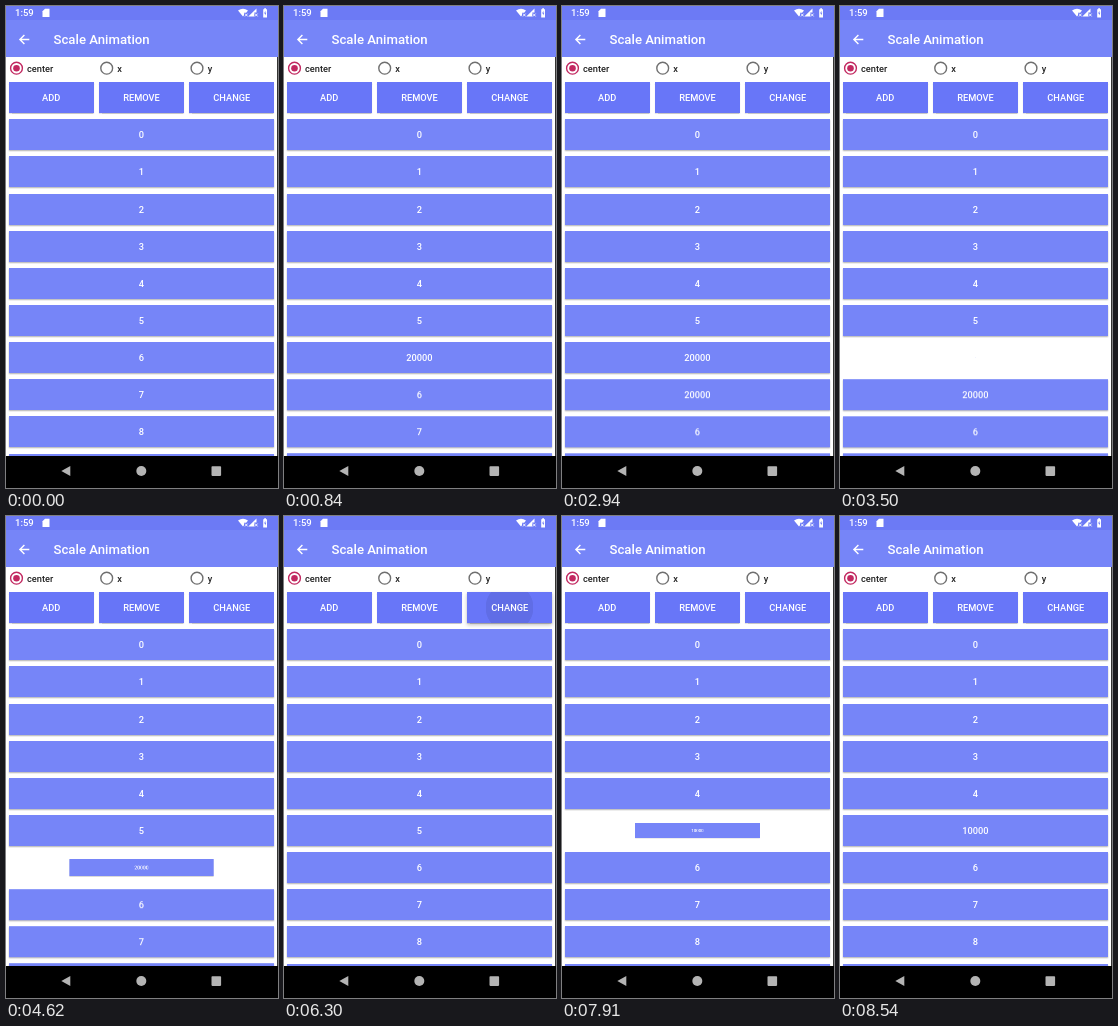
An HTML page for the animation above (8750 ms loop, 272 by 482 pixels).

```html
<!DOCTYPE html>
<html lang="en">
<head>
<meta charset="utf-8">
<title>Scale Animation</title>
<style>
html, body { margin: 0; width: 100%; height: 100%; overflow: hidden; background: #fff; }
#stage { position: relative; width: 272px; height: 482px; overflow: hidden; background: #fff;
  font: 500 9.26px/31px Roboto, sans-serif; color: #fff; }
#stage > svg { position: absolute; left: 0; top: 0; }
.row, .btn { position: absolute; text-align: center; white-space: nowrap; }
.row { left: 3px; width: 265px; height: 31px; background: #7685f8; box-shadow: 0 1px 1.3px rgba(0,0,0,.3); }
.btn { top: 76px; width: 85px; height: 31px; background: #6876f8; box-shadow: 0 .6px 1px rgba(0,0,0,.22); }
.btn i { position: absolute; inset: 0; overflow: hidden; }
.btn i::before { content: ""; }
.btn b { position: absolute; left: -8px; top: -35px; width: 101px; height: 101px; border-radius: 50%;
  background: #000; opacity: 0; }
.btn u { position: absolute; inset: 0; opacity: 0; box-shadow: 0 1.5px 4px rgba(0,0,0,.3); }
.btn span { position: relative; }
</style>
</head>
<body>
<div id="stage">
  <div id="list"></div>
  <div id="bar"></div>
  <svg width="272" height="482" viewBox="0 0 272 482" font-family="Roboto, sans-serif">
    <rect width="272" height="51" fill="#7685f8"/>
    <rect width="272" height="14" fill="#6c7af5"/>
    <g fill="#fff" font-weight="500">
      <text x="9" y="10.3" font-size="9.5">1:59</text>
      <text x="47.5" y="38.3" font-size="13.2">Scale Animation</text>
      <path d="M39 2.7h4.5v8.2h-7V5.2z"/>
      <path d="M232 4.6q5-3.8 10 0l-1.8 2.1h-2.2v2.6l-1 1.3z"/>
      <path d="M250.5 2.4v4h-2.2v4.2h-6z"/>
      <path d="M257.2 3.2h1v-1h1.8v1h1v8.2h-3.8z"/>
    </g>
    <path d="M259.4 4.8l-1.3 2.8h.9v2l1.3-2.8h-.9z" fill="#6c7af5"/>
    <path d="M239 7.6l2.6 2.8m0-2.8l-2.6 2.8M249 7.6l2.6 2.8m0-2.8l-2.6 2.8" stroke="#fff" stroke-width=".9"/>
    <path d="M23.3 33.5h-9M18.4 29l-4.5 4.5 4.5 4.5" fill="none" stroke="#fff" stroke-width="1.4"/>
    <g fill="none" stroke="#6f6f6f" stroke-width="1.4">
      <circle cx="10.5" cy="62.2" r="5.9" stroke="#c22860"/>
      <circle cx="100.7" cy="62.2" r="5.9"/>
      <circle cx="191" cy="62.2" r="5.9"/>
    </g>
    <circle cx="10.5" cy="62.2" r="3.3" fill="#c22860"/>
    <g fill="#222" font-size="9.26">
      <text x="21" y="65.8">center</text>
      <text x="111.3" y="65.8">x</text>
      <text x="201.7" y="65.8">y</text>
    </g>
    <rect x="271" y="51" width="1" height="399" fill="#333"/>
    <rect y="450" width="272" height="32" fill="#000"/>
    <g fill="#b4b4b4">
      <path d="M64.3 460v10l-9-5z"/>
      <circle cx="135.3" cy="465" r="5"/>
      <rect x="205.5" y="460.3" width="9.6" height="9.6" rx=".8"/>
    </g>
  </svg>
</div>
<script>
const LOOP = 8750, PITCH = 37.15, TOP = 113.2;
const EASE = 'cubic-bezier(.365,0,.635,1)';
const list = document.getElementById('list');
const bar = document.getElementById('bar');

// steps: [from ms, to ms, new value]
function play(el, prop, first, steps, easing = EASE) {
  const frames = [{ [prop]: first, offset: 0 }];
  let now = first;
  for (const [from, to, value] of steps) {
    frames.push({ [prop]: now, offset: from / LOOP, easing });
    frames.push({ [prop]: value, offset: to / LOOP });
    now = value;
  }
  frames.push({ [prop]: now, offset: 1 });
  el.animate(frames, { duration: LOOP, iterations: Infinity });
}

function addRow(label, slot) {
  const el = document.createElement('div');
  el.className = 'row';
  el.textContent = label;
  el.style.top = TOP + slot * PITCH + 'px';
  list.append(el);
  return el;
}

const shift = n => `0px ${n * PITCH}px`;
const rows = Array.from({ length: 10 }, (_, i) => addRow(i, i));

// Rows below the insertion point make room, then close up again
for (const el of rows.slice(6)) {
  play(el, 'translate', shift(0), [
    [310, 560, shift(1)], [1650, 1900, shift(2)],
    [3510, 3760, shift(1)], [4753, 5003, shift(0)]
  ]);
}

const older = addRow('20000', 6);
play(older, 'translate', shift(0), [[1650, 1900, shift(1)], [3510, 3760, shift(0)]]);
play(older, 'scale', '0', [[560, 810, '1'], [4503, 4753, '0']]);

const newer = addRow('20000', 6);
play(newer, 'scale', '0', [[1900, 2150, '1'], [3260, 3510, '0']]);

// Item 5 shrinks away and its replacement grows in
play(rows[5], 'scale', '1', [[6430, 7430, '0']]);
play(addRow('10000', 5), 'scale', '0', [[7430, 8430, '1']]);

function addButton(label, x, presses) {
  const el = document.createElement('div');
  el.className = 'btn';
  el.style.left = x + 'px';
  el.innerHTML = `<u></u><i><b></b></i><span>${label}</span>`;
  bar.append(el);
  const raise = [], grow = [], fade = [];
  for (const t of presses) {
    raise.push([t, t + 90, 1], [t + 200, t + 320, 0]);
    grow.push([t, t + 220, '1'], [t + 500, t + 501, '0']);
    fade.push([t, t + 80, .08], [t + 220, t + 450, 0]);
  }
  play(el.querySelector('u'), 'opacity', 0, raise, 'linear');
  play(el.querySelector('b'), 'scale', '0', grow, 'ease-out');
  play(el.querySelector('b'), 'opacity', 0, fade, 'linear');
}

addButton('ADD', 2.7, [60, 1430]);
addButton('REMOVE', 93, [3040, 4190]);
addButton('CHANGE', 183.3, [6230]);
</script>
</body>
</html>
```
